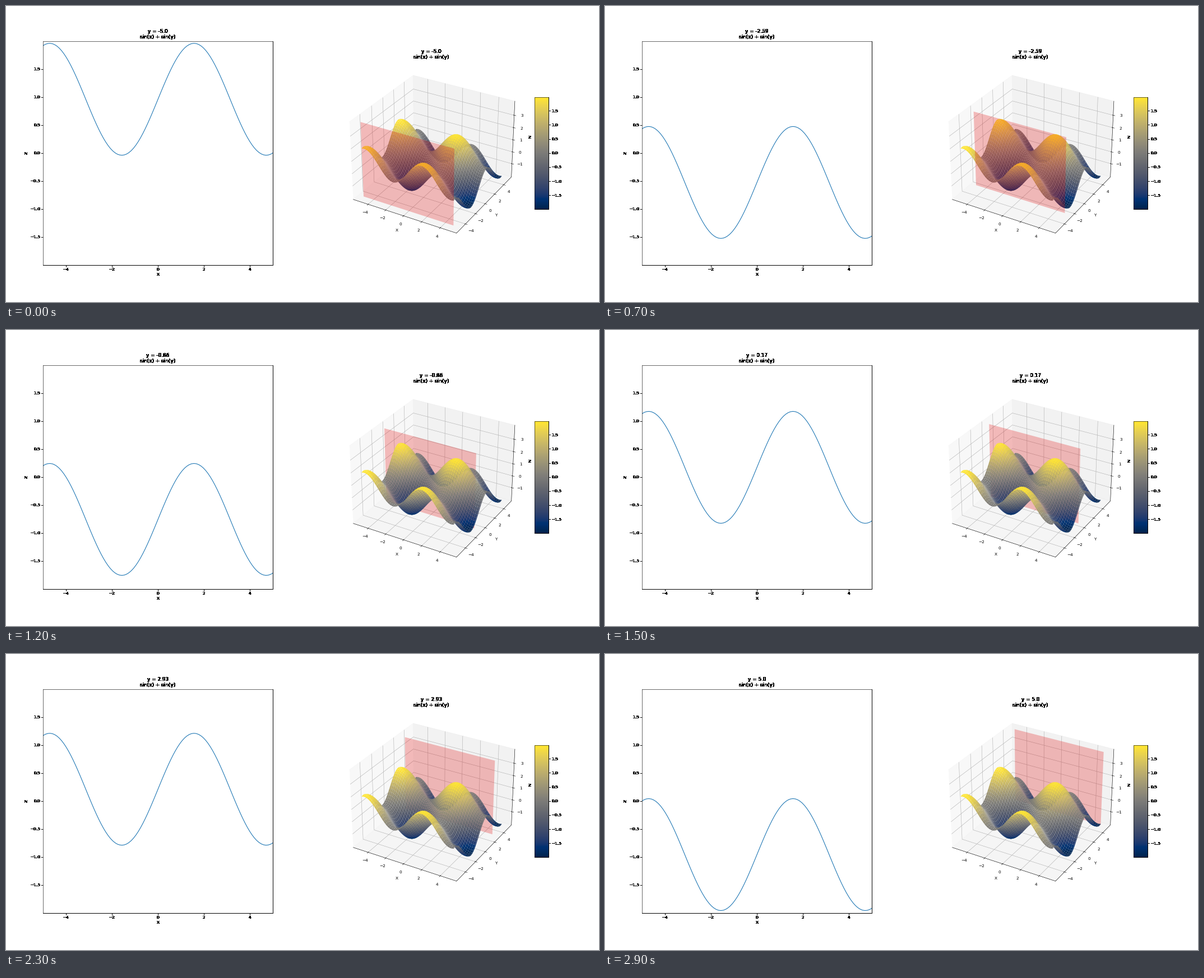
These frames come from a looping animation (1058 by 529 pixels, 3 s). A matplotlib script:

```python
import numpy as np
import matplotlib.pyplot as plt
from matplotlib.animation import FuncAnimation
from mpl_toolkits.mplot3d.art3d import Poly3DCollection

W, H, DPI = 1058, 529, 52.9
FRAMES, INTERVAL = 30, 100
CELL_W, CELL_H = 410, 400
LEFT, RIGHT_CELL, MIDDLE = 66.1, 594.8, 262.6

plt.rcParams["font.family"] = "DejaVu Sans"
fig = plt.figure(figsize=(W / DPI, H / DPI), dpi=DPI, facecolor="white")


def pixel_axes(left, width, height, **kwargs):
    """Add axes at a pixel position, centred on the common middle line."""
    bottom = H - MIDDLE - height / 2
    return fig.add_axes([left / W, bottom / H, width / W, height / H], **kwargs)


def harden(image, dpi):
    """Make every touched pixel fully opaque, which gives heavy, jagged text."""
    solid = np.round(image * 255).astype(np.uint8)
    solid[..., 3] = np.where(solid[..., 3] > 0, 255, 0)
    return solid, 0, 0


grid = np.linspace(-5, 5, 100)
X, Y = np.meshgrid(grid, grid)
Z = np.sin(X) + np.sin(Y)
low, high = Z.min(), 2 * Z.max()
half_ticks = np.arange(-1.5, 1.6, 0.5)
even_ticks = np.arange(-4, 5, 2)


def plane_corners(y):
    return [[(-5, y, low), (5, y, low), (5, y, high), (-5, y, high)]]


# Slice plot
flat = pixel_axes(LEFT, CELL_W, CELL_H)
flat.set(xlim=(-5, 5), ylim=(Z.min(), Z.max()), xlabel="X", ylabel="Z",
         xticks=even_ticks, yticks=half_ticks)
curve, = flat.plot(grid, np.sin(grid))
flat.set_agg_filter(harden)

# Surface with the moving cutting plane
space_size = 0.8 * CELL_W
space = pixel_axes(RIGHT_CELL, space_size, space_size, projection="3d")
surface = space.plot_surface(X, Y, Z, cmap="cividis")
plane = Poly3DCollection(plane_corners(-5), facecolors=[(0.883, 0, 0, 0.25)],
                         edgecolors="none", linewidths=0)
space.add_collection3d(plane)
side = 5.5 * 25 / 24
space.set(xlabel="X", ylabel="Y", zlabel="Z",
          xticks=even_ticks, yticks=even_ticks, zticks=range(-1, 4))
space.set(xlim=(-side, side), ylim=(-side, side), zlim=(-2.125, 4.125))
space.title.set_agg_filter(harden)
space.zaxis.label.set_agg_filter(harden)

bar_height = CELL_H / 2
bar = pixel_axes(RIGHT_CELL + 0.85 * CELL_W, bar_height / 8, bar_height)
fig.colorbar(surface, cax=bar, ticks=half_ticks)
bar.set_agg_filter(harden)


def update(frame):
    y = -5 + 10 * frame / (FRAMES - 1)
    title = f"y = {round(y, 2)}\nsin(x) + sin(y)"
    flat.set_title(title)
    space.set_title(title)
    curve.set_ydata(np.sin(grid) + np.sin(y))
    plane.set_verts(plane_corners(y))
    return curve, plane


animation = FuncAnimation(fig, update, frames=FRAMES, interval=INTERVAL,
                          repeat=True, repeat_delay=0, blit=False)
plt.show()
```
